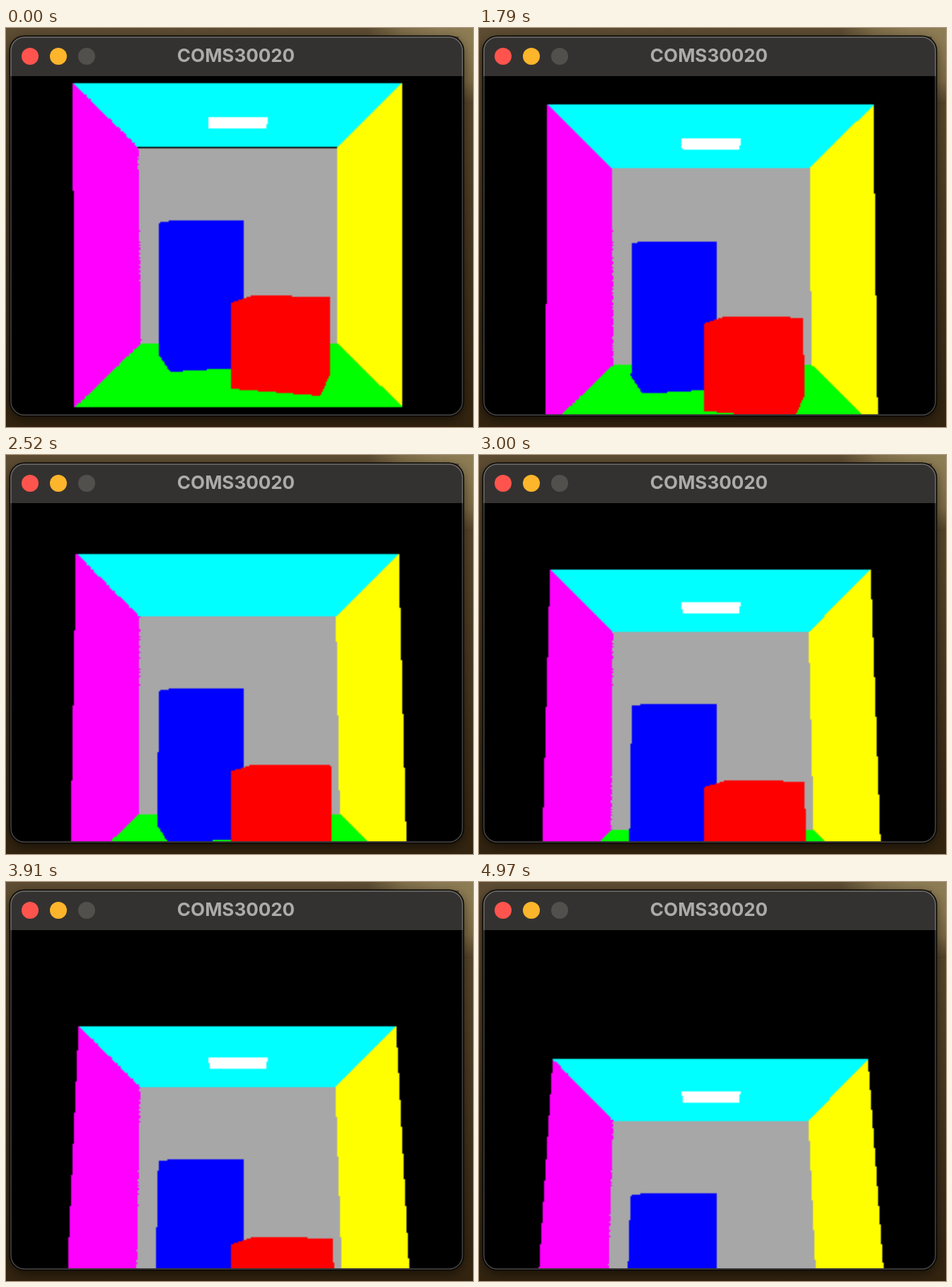
Animation of 660 by 564 pixels, one loop 5000 ms. Source, as an HTML page with a canvas:

```html
<!DOCTYPE html>
<html>
<head>
<meta charset="utf-8">
<style>
  html, body { margin: 0; width: 100%; height: 100%; overflow: hidden; background: #000; }
  canvas { display: block; }
</style>
</head>
<body>
<canvas id="stage" width="660" height="564"></canvas>
<script>
const g = document.getElementById('stage').getContext('2d');
const LOOP = 5000, FOCAL = 728, CX = 327, CY = 308, TILT = 0.00497;
const LEFT = 6, TOP = 68;

// The scene is rendered at half size, then enlarged softly
const view = document.createElement('canvas');
view.width = 320;
view.height = 239;
const v = view.getContext('2d');

// Corners as [screen x, screen y, depth], seen with the camera level
const NEAR = 3.03, FAR = 5.01;
const ntl = [94, 77.3, NEAR], ntr = [560, 77.3, NEAR], nbl = [97, 536, NEAR], nbr = [560.5, 536, NEAR];
const ftl = [186.5, 169, FAR], ftr = [468, 169, FAR], fbl = [190, 446, FAR], fbr = [469, 446, FAR];
const lamp = [[285, 126, 3.83], [371, 126, 3.83], [368, 142, 4.2], [287, 142, 4.2]];
const tall = [[216, 275.4, 4.49], [232, 272.6, 3.88], [336, 272.6, 4.02],
              [336, 480, 4.02], [232, 486, 3.88], [216, 462, 4.49]];
const short = [[318, 388, 3.42], [350, 378, 3.9], [458, 380, 3.8],
               [458, 490, 3.8], [444, 520, 3.26], [318, 510, 3.42]];

const noise = n => { const s = Math.sin(n * 12.9898) * 43758.5453; return s - Math.floor(s); };

function project([x, y, z], angle) {
  const c = Math.cos(angle), s = Math.sin(angle), h = (y - CY) * z / FOCAL;
  const depth = z * c - h * s;
  return [(CX + (x - CX) * z / depth - LEFT) / 2,
          (CY + FOCAL * (h * c + z * s) / depth - TOP) / 2];
}

// Fills a convex shape in hard-edged rows of pixels
function fill(points, color, angle, ragged) {
  const p = points.map(q => project(q, angle));
  const ys = p.map(q => q[1]);
  const end = Math.min(view.height, Math.round(Math.max(...ys)));
  v.fillStyle = color;
  for (let y = Math.max(0, Math.round(Math.min(...ys))); y < end; y++) {
    const mid = y + 0.5, xs = [];
    p.forEach(([x1, y1], i) => {
      const [x2, y2] = p[(i + 1) % p.length];
      if ((y1 <= mid) !== (y2 <= mid)) xs.push(x1 + (x2 - x1) * (mid - y1) / (y2 - y1));
    });
    if (!xs.length) continue;
    const a = Math.round(Math.min(...xs));
    const b = Math.round(Math.max(...xs) + (ragged ? noise(y) * 0.6 : 0));
    v.fillRect(a, y, b - a, 1);
  }
}

function gradient(x, y, w, h, vertical, ...colors) {
  const f = g.createLinearGradient(x, y, vertical ? x : x + w, vertical ? y + h : y);
  colors.forEach((c, i) => f.addColorStop(i / (colors.length - 1), c));
  g.fillStyle = f;
  g.fillRect(x, y, w, h);
}

function windowPath(inset) {
  g.beginPath();
  g.roundRect(LEFT + inset, 12 + inset, 640 - 2 * inset, 536 - 2 * inset, 20 - inset);
}

function outline(inset, color, width) {
  windowPath(inset);
  g.strokeStyle = color;
  g.lineWidth = width;
  g.stroke();
}

function desktop() {
  gradient(0, 0, 660, 564, true, '#5e4d33', '#564529', '#4a3922', '#3d2e19', '#33240f');
  gradient(512, 0, 148, 12, false, '#5e4d33', '#7f6e49', '#8d7c54', '#8d7c54');
  gradient(640, 8, 20, 100, true, '#8d7c54', '#8a7850', '#7d6b45', '#54432a');
  g.save();
  g.shadowColor = 'rgba(0,0,0,.6)';
  g.shadowBlur = 18;
  g.shadowOffsetY = 5;
  windowPath(0);
  g.fillStyle = '#000';
  g.fill();
  g.restore();
}

function titleBar() {
  g.fillStyle = '#343230';
  g.fillRect(LEFT, 12, 640, 56);
  ['#ff544d', '#fdb52b', '#52504d'].forEach((c, i) => {
    g.fillStyle = c;
    g.beginPath();
    g.arc(34 + 40 * i, 40, 12, 0, 7);
    g.fill();
  });
  g.fillStyle = '#adabaa';
  g.font = '700 26px Inter, sans-serif';
  g.textAlign = 'center';
  g.fillText('COMS30020', 325, 48);
}

// One key press, a pause, then steady key repeat
function stepsAt(t) {
  return t < 700 ? 0 : Math.max(1, Math.floor((t - 1115) / 83));
}

function scene(t) {
  const n = stepsAt(t), angle = n * TILT;
  v.fillStyle = '#000';
  v.fillRect(0, 0, view.width, view.height);
  fill([ftl, ftr, fbr, fbl], '#a7a7a7', angle);
  fill([ntl, ntr, ftr, ftl], '#00ffff', angle);
  fill([fbl, fbr, nbr, nbl], '#00ff00', angle);
  fill([ntr, nbr, fbr, ftr], '#ffff00', angle);
  fill([ntl, ftl, fbl, nbl], '#ff00ff', angle, true);
  if (n % 11 !== 5) fill(lamp, '#fff', angle); // the lamp loses the depth test at times
  fill(tall, '#0000ff', angle);
  fill(short, '#ff0000', angle);
  g.drawImage(view, LEFT, TOP, view.width * 2, view.height * 2);
}

function draw() {
  desktop();
  outline(-0.5, '#0c0905', 2);
  g.save();
  windowPath(0);
  g.clip();
  scene(performance.now() % LOOP);
  titleBar();
  g.restore();
  outline(1, 'rgba(255,255,255,.28)', 1.5);
  requestAnimationFrame(draw);
}
draw();
</script>
</body>
</html>
```
